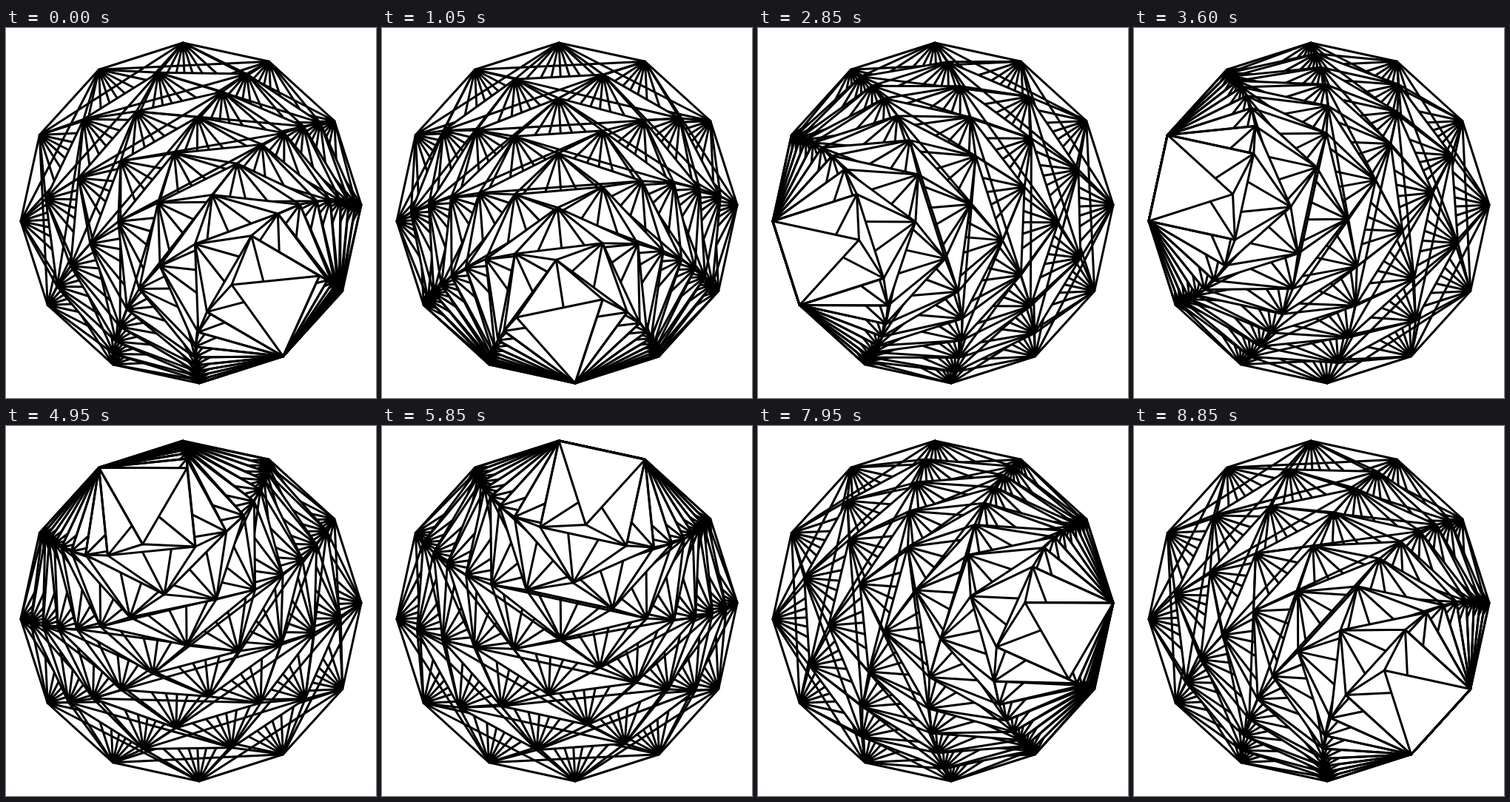
An HTML page with a canvas for the animation above (9 s loop, 500 by 500 pixels).

```html
<!DOCTYPE html>
<html lang="en">
<head>
<meta charset="utf-8">
<title>Rolling polygons</title>
<style>
  html, body { margin: 0; width: 100%; height: 100%; overflow: hidden; background: #fff; }
  canvas { display: block; }
</style>
</head>
<body>
<canvas id="stage" width="500" height="500"></canvas>
<script>
const ctx = document.getElementById('stage').getContext('2d');
const TAU = 2 * Math.PI;
const SIDES = 12, RADIUS = 230.3, CENTER = 250;
const TURN = TAU / SIDES;
const SIDE = 2 * RADIUS * Math.sin(TURN / 2);
const START = -TAU / 4 - TURN / 11;
const STEP_MS = 150, STEPS_PER_EDGE = 5, FIRST_STEP = 21;
const STEPS = SIDES * STEPS_PER_EDGE;

// Vertices of a regular n-gon, walked from a point along a first heading.
function walk(n, x, y, heading) {
  return Array.from({ length: n }, (_, i) => {
    const point = [x, y];
    x += SIDE * Math.cos(heading + i * TAU / n);
    y += SIDE * Math.sin(heading + i * TAU / n);
    return point;
  });
}

function addLine(a, b) {
  ctx.moveTo(...a);
  ctx.lineTo(...b);
}

// White polygon with all its sides and diagonals.
function drawPolygon(points) {
  ctx.beginPath();
  points.forEach(p => ctx.lineTo(...p));
  ctx.closePath();
  ctx.fill();
  ctx.stroke();
  ctx.beginPath();
  points.forEach((a, i) => points.slice(i + 2).forEach(b => addLine(a, b)));
  ctx.stroke();
}

// Zigzag between a polygon and the next larger one around it.
function drawLinks(inner, outer) {
  ctx.beginPath();
  inner.forEach((a, i) => {
    addLine(a, outer[i]);
    addLine(a, outer[i + 1]);
  });
  ctx.stroke();
}

// Each polygon rolls inside the next larger one, all about the same pivot.
function draw(step) {
  const edge = Math.floor(step / STEPS_PER_EDGE);
  const progress = step % STEPS_PER_EDGE / STEPS_PER_EDGE;
  const pivot = START + (edge + 1) * TURN;
  const x = CENTER + RADIUS * Math.cos(pivot);
  const y = CENTER + RADIUS * Math.sin(pivot);
  const edgeHeading = pivot - TURN / 2 + TAU / 4;

  ctx.fillStyle = '#fff';
  ctx.fillRect(0, 0, 500, 500);
  ctx.strokeStyle = '#000';
  ctx.lineWidth = 3;
  ctx.lineJoin = ctx.lineCap = 'round';
  let outer;
  for (let n = SIDES; n >= 3; n--) {
    const turn = TAU / n;
    const points = walk(n, x, y, edgeHeading + turn - progress * (turn - TURN));
    if (outer) drawLinks(points, outer);
    drawPolygon(points);
    outer = points;
  }
}

const begin = performance.now();
function tick() {
  const elapsed = performance.now() - begin;
  draw((Math.floor(elapsed / STEP_MS) + FIRST_STEP) % STEPS);
  requestAnimationFrame(tick);
}
tick();
</script>
</body>
</html>
```
